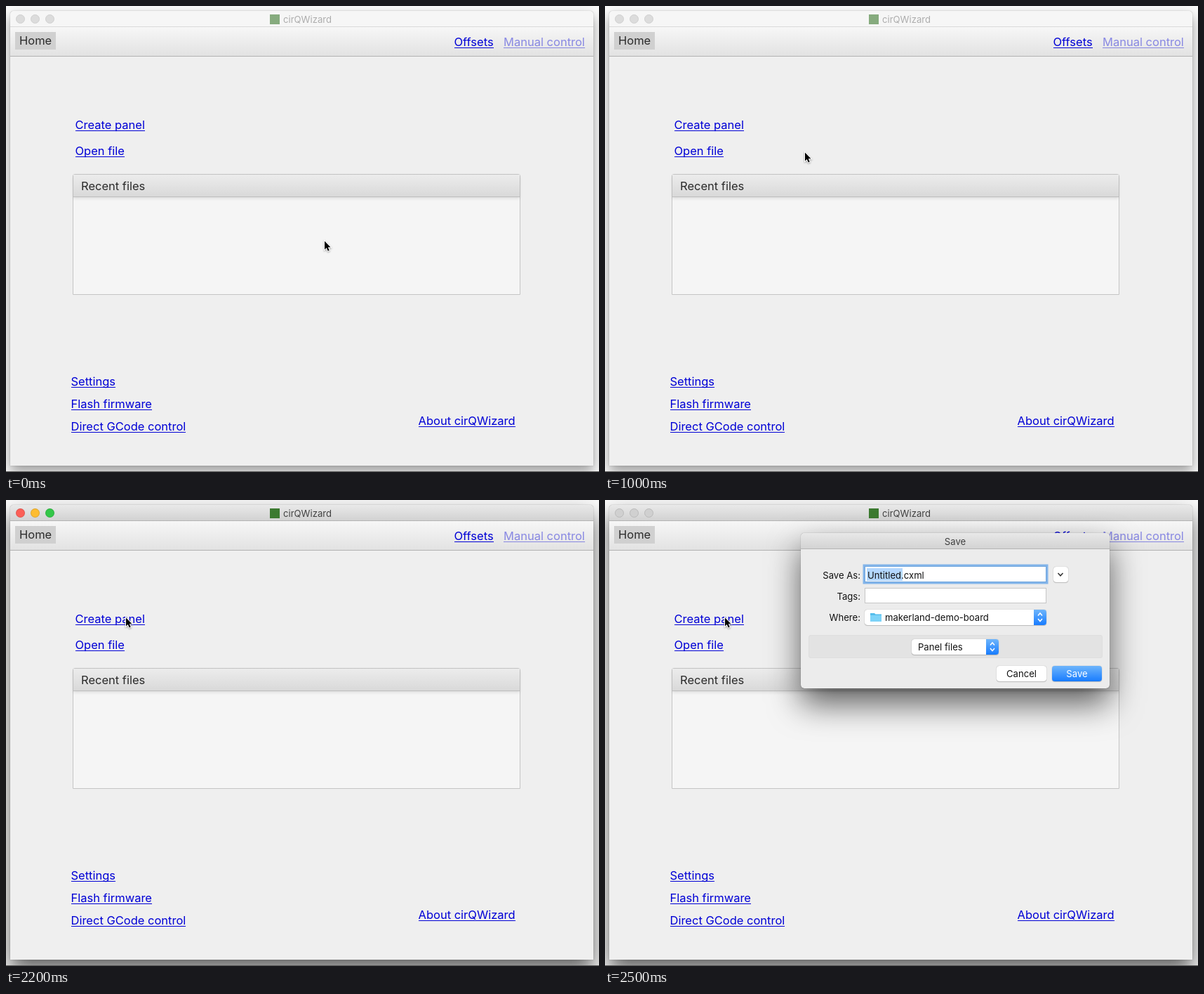
These frames come from a looping animation (845x663 px, 4.5 s). An HTML page:

```html
<!DOCTYPE html>
<html lang="en">
<head>
<meta charset="utf-8">
<title>cirQWizard</title>
<style>
html, body { margin: 0; width: 100%; height: 100%; overflow: hidden; background: #fbfbfb; }
body { position: relative; font: 16.5px/16px Inter, sans-serif; color: #2b2b2b; }
div, a, svg { position: absolute; box-sizing: border-box; white-space: nowrap; }
a { color: #0000d6; border-bottom: 1px solid; box-sizing: content-box; height: 16px; }

#win { left: 6px; top: 7px; width: 831px; height: 647px; border-radius: 5px 5px 0 0; background: #efefef;
  box-shadow: 0 0 1px rgba(0,0,0,.5), 0 8px 18px rgba(0,0,0,.4); }
#bar { left: 0; top: 0; width: 831px; height: 23px; border-radius: 5px 5px 0 0;
  background: #f6f6f6; border-bottom: 1px solid #d9d9d9; color: #adadad; font-size: 13.1px; }
#bar i { position: absolute; top: 5px; width: 13px; height: 13px; border-radius: 50%; box-sizing: border-box;
  background: #dcdcdc; border: 1px solid #d0d0d0; }
#icon { left: 370px; top: 5px; width: 14px; height: 14px; background: #3c7a30; opacity: .6; }
.main #win { box-shadow: 0 0 1px rgba(0,0,0,.6), 0 15px 30px rgba(0,0,0,.63); }
.main #bar { background: linear-gradient(#e9e9e9, #d2d2d2); border-color: #b4b4b4; color: #424242; }
.main #bar i { background: #d0d0d0; border-color: #bababa; }
.main #icon { opacity: 1; }
.key #bar i { background: var(--c); border-color: rgba(0,0,0,.12); }

#tools { left: 0; top: 23px; width: 831px; height: 42px; background: linear-gradient(#f7f7f7, #e2e2e2); border-bottom: 1px solid #b2b2b2; }
#home { left: 13px; top: 37px; width: 58px; height: 25px; padding: 4px 6px; background: #d0d0d0; }
#recent { left: 95px; top: 239px; width: 638px; height: 172px; border: 1px solid #c5c5c5; border-radius: 3px 3px 0 0; background: #f5f5f5; }
#head { left: 0; top: 0; width: 636px; height: 32px; padding: 8px 11px; border-bottom: 1px solid #bebebe;
  background: linear-gradient(#ececec, #d9d9d9); box-shadow: 0 2px 4px rgba(0,0,0,.1); }
.hover #head { background: linear-gradient(#f6f6f6, #e5e5e5); }

#save { left: 279px; top: 47px; width: 440px; height: 221px; border-radius: 5px; background: #ececec; color: #111; font-size: 13.1px;
  box-shadow: 0 0 1px rgba(0,0,0,.6), 0 22px 46px rgba(0,0,0,.62); }
#save .title { left: 0; top: 0; width: 440px; height: 23px; padding-top: 4px; border-radius: 5px 5px 0 0; text-align: center;
  color: #404040; background: linear-gradient(#e8e8e8, #d3d3d3); border-bottom: 1px solid #b5b5b5; }
.label { right: 355px; }
.field { background: #fff; border: 1px solid #c6c6c6; }
.btn { height: 22px; padding-top: 3px; border-radius: 4px; background: #fff; text-align: center;
  box-shadow: 0 0 1px rgba(0,0,0,.4), 0 1px 1px rgba(0,0,0,.18); }
.blue { background: linear-gradient(#6eb5fb, #187cff); color: #fff; }
.cap { right: 0; top: 0; width: 18px; height: 22px; border-radius: 0 4px 4px 0; }
svg { overflow: visible; fill: none; }
</style>
</head>
<body>
<div id="win">
  <div id="bar">
    <i style="left:8px;--c:#fc5f57"></i><i style="left:29px;--c:#fdbc30"></i><i style="left:50px;--c:#33c748"></i>
    <div id="icon"></div>
    <div style="left:389px;top:4px">cirQWizard</div>
  </div>
  <div id="tools"></div>
</div>
<div id="home">Home</div>
<a style="left:638.5px;top:43px">Offsets</a>
<a style="left:709px;top:43px;opacity:.42">Manual control</a>
<a style="left:98.5px;top:161px">Create panel</a>
<a style="left:98.5px;top:198px">Open file</a>
<div id="recent"><div id="head">Recent files</div></div>
<a style="left:92.5px;top:526px">Settings</a>
<a style="left:92.5px;top:558px">Flash firmware</a>
<a style="left:92.5px;top:590px">Direct GCode control</a>
<a style="left:587.5px;top:582px">About cirQWizard</a>
<div style="left:0;top:662px;width:845px;height:1px;background:#555"></div>

<div id="save">
  <div class="title">Save</div>
  <div class="label" style="top:52px">Save As:</div>
  <div class="field" style="left:91px;top:47px;width:259px;height:23px;border-color:#6fa5dc;box-shadow:0 0 0 2.5px #84b5ea"></div>
  <div style="left:94px;top:50px;width:51px;height:18px;background:#b3d7fe"></div>
  <div style="left:95px;top:52px">Untitled.cxml</div>
  <div class="btn" style="left:360px;top:48px;width:21px"></div>
  <svg style="left:370px;top:59px" width="1" height="1"><path d="M-3.5-2 0 1.8 3.5-2" stroke="#333" stroke-width="1.5"/></svg>
  <div class="label" style="top:82px">Tags:</div>
  <div class="field" style="left:91px;top:78px;width:259px;height:22px"></div>
  <div class="label" style="top:112px">Where:</div>
  <div class="btn" style="left:91px;top:109px;width:259px"><div class="cap blue"></div></div>
  <svg style="left:99px;top:113px" width="16" height="13"><path d="M0 1h6l1.5 1.500H16V13H0z" fill="#54bdec"/><path d="M0 4h16v9H0z" fill="#7dd3f8"/></svg>
  <div style="left:120px;top:112px">makerland-demo-board</div>
  <div style="left:11px;top:145px;width:419px;height:33px;background:#e3e3e3;border:1px solid #dedede;border-radius:3px"></div>
  <div class="btn" style="left:158px;top:151px;width:124px"><div class="cap blue"></div></div>
  <div style="left:167px;top:154px">Panel files</div>
  <svg width="1" height="1" stroke="#fff" stroke-width="1.5" style="left:0;top:0">
    <path id="arrows" d="M338 117.500l3-3.500 3 3.500M338 122l3 3.500 3-3.500"/>
    <use href="#arrows" x="-68" y="42"/>
  </svg>
  <div class="btn" style="left:279px;top:189px;width:71px">Cancel</div>
  <div class="btn blue" style="left:358px;top:189px;width:71px">Save</div>
</div>

<svg id="cursor" width="12" height="18" style="left:0;top:0;filter:drop-shadow(0 1px 1px rgba(0,0,0,.35))">
  <path d="M1 1.500V13.500L3.700 11 5.700 15.500 7.700 14.700 5.800 10.200H9.500z" fill="#000" stroke="#fff" stroke-width="2" paint-order="stroke"/>
</svg>

<script>
const LOOP = 4500, STEP = 100;
const save = document.getElementById('save'), cursor = document.getElementById('cursor');
// Pointer path: step, x, y
const path = [[0, 453, 333], [5, 364, 261], [10, 284, 207], [14, 210, 175], [18, 170, 166]];

function slope(i, k) {
  if (i === path.length - 1) return 0;
  const a = path[Math.max(i - 1, 0)], b = path[i + 1];
  return (b[k] - a[k]) / (b[0] - a[0]);
}

function pointer(step) {
  const s = Math.min(step, 18);
  const i = Math.max(0, path.findIndex(p => p[0] >= s) - 1);
  const a = path[i], b = path[i + 1], d = b[0] - a[0], u = (s - a[0]) / d, v = 1 - u;
  return [1, 2].map(k => Math.round(
    v * v * (1 + 2 * u) * a[k] + u * u * (3 - 2 * u) * b[k] +
    d * u * v * (v * slope(i, k) - u * slope(i + 1, k))));
}

function draw(now) {
  const step = Math.floor(now % LOOP / STEP);
  const [x, y] = pointer(step);
  cursor.style.transform = `translate(${x}px, ${y}px)`;
  const list = document.body.classList;
  list.toggle('hover', x > 95 && x < 733 && y >= 240 && y < 272);
  list.toggle('main', step >= 22);
  list.toggle('key', step === 22 || step === 23);
  const open = Math.max(0, Math.min(1, (step - 23) / 2));
  save.style.opacity = open;
  save.style.transform = open < 1 ? `scale(${.9 + .1 * open})` : 'none';
}

const start = performance.now();
function tick() {
  draw(performance.now() - start);
  requestAnimationFrame(tick);
}
tick();
</script>
</body>
</html>
```
